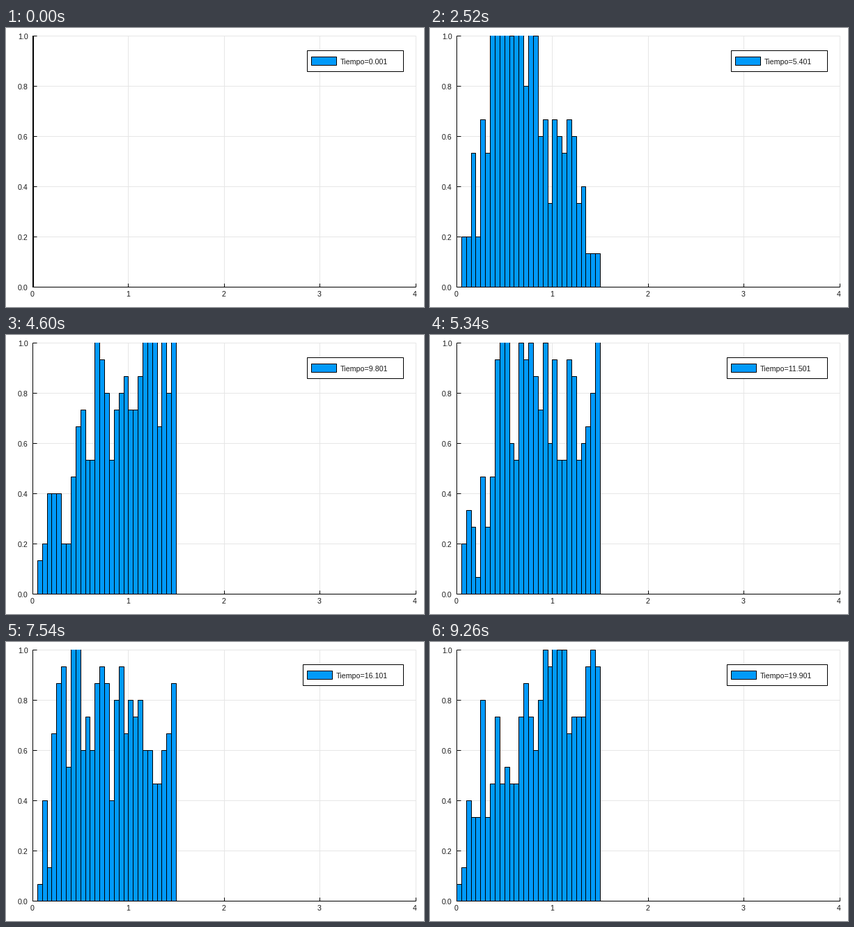
Animation of 600 by 400 pixels, one loop 9280 ms. Source, as a matplotlib script:

```python
import numpy as np
import matplotlib.pyplot as plt
from matplotlib.animation import FuncAnimation
from matplotlib.collections import LineCollection
from matplotlib.patches import PathPatch, Rectangle
from matplotlib.path import Path

PX = 0.72                     # points per pixel at 100 dpi
BLUE, INK = "#009afa", "#1a1a1a"
N, BINS, WALL = 300, 30, 1.5
STEPS, DT, JUMP = 200, 0.1, 0.061


def X(v):
    return 38 + 137.4 * v


def Y(v):
    return 371 - 360 * v


def time_at(step):
    return 0.001 + DT * step


# --- particles diffusing from the centre of a round box ---

def spread(t):
    """Width of the cloud: free growth at first, then slow breathing."""
    if t < 3.1:
        return 0.37 * (t / 3.1) ** 0.6
    return np.interp(t, [3.1, 7.7, 9.8, 13.3, 16.1, 19.9],
                     [.37, .72, .84, .60, .65, .82])


def simulate():
    """Distance of every particle from the centre at every step."""
    rng = np.random.default_rng(7)
    z = rng.normal(size=(N, 2))
    dist = np.empty((STEPS, N))
    for i in range(STEPS):
        s = spread(time_at(i))
        fresh = min(1, (JUMP / s) ** 2)
        z = np.sqrt(1 - fresh) * z + np.sqrt(fresh) * rng.normal(size=(N, 2))
        r = s * np.hypot(*z.T)
        dist[i] = np.where(r > WALL, abs(2 * WALL - r), r)   # bounce off the wall
    return dist


dist = simulate()


def bin_width(r):
    """Round (max - min) / BINS to 1, 2, 5 or 10 times a power of ten."""
    raw = np.ptp(r) / BINS
    unit = 10.0 ** np.floor(np.log10(raw))
    for limit, m in ((1.1, 1), (2.2, 2), (5.5, 5)):
        if raw / unit <= limit:
            return m * unit
    return 10 * unit


def bars_path(r):
    w = bin_width(r)
    counts = np.bincount(np.floor(r / w).astype(int))
    verts, codes = [], []
    for i in np.flatnonzero(counts):
        h = min(counts[i] / (N * w), 1.1)
        a, b, y0, y1 = X(i * w), X((i + 1) * w), Y(0), Y(h)
        verts += [(a, y0), (a, y1), (b, y1), (b, y0), (a, y0)]
        codes += [Path.MOVETO] + [Path.LINETO] * 3 + [Path.CLOSEPOLY]
    return Path(verts, codes)


# --- stage ---

fig = plt.figure(figsize=(6, 4), dpi=100, facecolor="white")
ax = fig.add_axes([0, 0, 1, 1])
ax.set(xlim=(0, 600), ylim=(400, 0))
ax.axis("off")


def lines(segments, color, z):
    ax.add_collection(LineCollection(segments, colors=color, linewidths=PX, zorder=z))


def label(x, y, s, ha, z=2):
    return ax.text(x, y, s, ha=ha, va="baseline", color=INK, zorder=z,
                   family="Liberation Sans", size=10.6 * PX)


def box(x, y, w, h, color, z):
    return ax.add_patch(Rectangle((x, y), w, h, fc=color, ec="black", lw=PX, zorder=z))


xs, ys = range(5), np.arange(6) / 5
lines([[(X(v), Y(0)), (X(v), Y(1))] for v in xs]
      + [[(X(0), Y(v)), (X(4), Y(v))] for v in ys], "#e6e6e6", 1)
lines([[(X(v), Y(0)), (X(v), Y(0) - 5)] for v in xs]
      + [[(X(0), Y(v)), (X(0) + 6, Y(v))] for v in ys]
      + [[(X(0), Y(0)), (X(4), Y(0))], [(X(0), Y(0)), (X(0), Y(1))]], "black", 2)
for v in xs:
    label(X(v) - 0.6, 385, str(v), "center")
for v in ys:
    label(31.6, Y(v) + 4.8, f"{v:.1f}", "right")

bars = ax.add_patch(PathPatch(bars_path(dist[0]), fc=BLUE, ec="black", lw=PX,
                              joinstyle="miter", zorder=3))
bars.set_clip_path(Rectangle((38, 11), 551, 361, transform=ax.transData))

frame = box(432, 32, 138, 30, "white", 4)
swatch = box(438, 41, 36, 12, BLUE, 5)
caption = label(480, 52, "", "left", 5)


def draw(tick):
    # three steps every seven ticks; the middle one is held for five
    cycle, phase = divmod(tick, 7)
    step = 3 * cycle + (phase > 0) + (phase > 5)
    t = time_at(step)
    left = 432 if t < 10 else 426
    bars.set_path(bars_path(dist[step]))
    frame.set_bounds(left, 32, 570 - left, 30)
    swatch.set_x(left + 6)
    caption.set_x(left + 48)
    caption.set_text(f"Tiempo={t:.3f}")
    return bars, frame, swatch, caption


anim = FuncAnimation(fig, draw, frames=464, interval=20, repeat=True)
plt.show()
```
